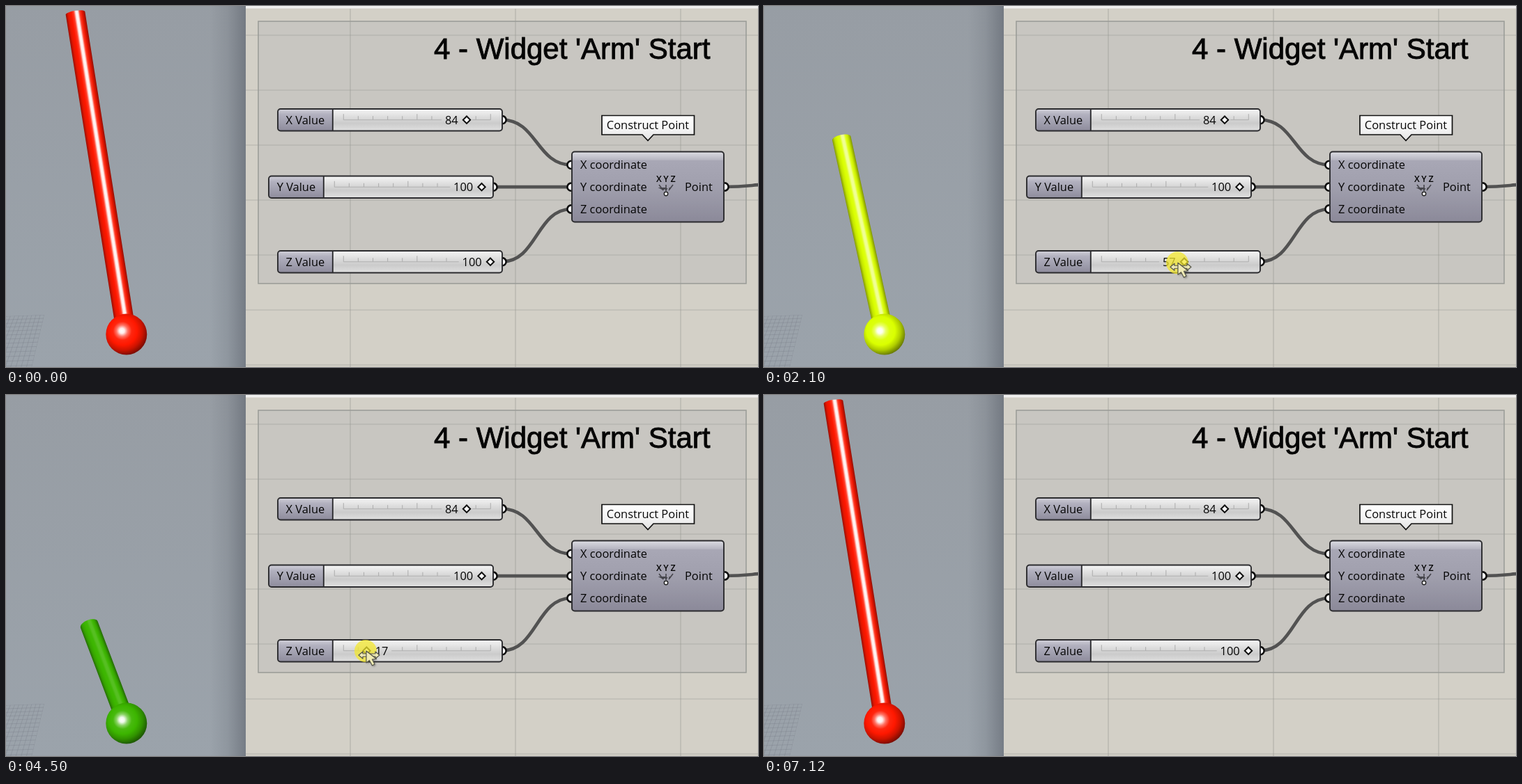
Animation of 1079x519 px, one loop 7650 ms. Source, as an HTML page with a canvas:

```html
<!DOCTYPE html>
<html lang="en">
<head>
<meta charset="utf-8">
<title>Widget arm</title>
<style>
  html, body { margin: 0; width: 100%; height: 100%; overflow: hidden; background: #d3d0c6; }
  canvas { display: block; }
</style>
</head>
<body>
<canvas id="stage" width="1079" height="519"></canvas>
<script>
const W = 1079, H = 519, LOOP = 7650;
const ctx = document.getElementById('stage').getContext('2d');
const LABEL = '16.4px "Open Sans", "Noto Sans", sans-serif';
const BALL = { x: 172.8, y: 472, r: 29.5 };

// the drag: time, unclamped slider value, pointer height
const DRAG = [
  [1230, 112, 365], [3080, -4, 374], [3960, -4, 374], [4500, 17, 368],
  [5340, 55, 347], [6200, 94, 352], [6440, 103, 350]
];

const clamp = (v, lo, hi) => Math.min(hi, Math.max(lo, v));
const mix = (a, b, k) => a + (b - a) * k;
const progress = (t, from, to) => clamp((t - from) / (to - from), 0, 1);
const knobAt = value => 481 + 2.14 * value;

function dragAt(t) {
  const i = DRAG.findIndex(key => t < key[0]);
  if (i === 0) return DRAG[0].slice(1);
  if (i < 0) return DRAG[DRAG.length - 1].slice(1);
  const a = DRAG[i - 1], b = DRAG[i], k = progress(t, a[0], b[0]);
  return [mix(a[1], b[1], k), mix(a[2], b[2], k)];
}

// k below zero darkens, above zero lightens
function shade(rgb, k) {
  return `rgb(${rgb.map(v => Math.round(k < 0 ? v * (1 + k) : mix(v, 255, k)))})`;
}

function ramp(g, stops) {
  stops.forEach(([at, color]) => g.addColorStop(at, color));
  return g;
}
const across = (x0, x1, stops) => ramp(ctx.createLinearGradient(x0, 0, x1, 0), stops);
const down = (y0, y1, stops) => ramp(ctx.createLinearGradient(0, y0, 0, y1), stops);

function path(points, close) {
  ctx.beginPath();
  points.forEach(([x, y]) => ctx.lineTo(x, y));
  if (close) ctx.closePath();
}

function line(x0, y0, x1, y1) {
  path([[x0, y0], [x1, y1]]);
  ctx.stroke();
}

function disc(x, y, r, fill) {
  ctx.beginPath();
  ctx.arc(x, y, r, 0, Math.PI * 2);
  ctx.fillStyle = fill;
  ctx.fill();
}

function pen(color, width) {
  ctx.strokeStyle = color;
  ctx.lineWidth = width;
}

function text(str, x, y, align = 'left', font = LABEL) {
  ctx.font = font;
  ctx.textAlign = align;
  ctx.fillStyle = '#050505';
  ctx.fillText(str, x, y);
}

function drawViewport() {
  ctx.fillStyle = down(0, H, [[0, '#979da4'], [1, '#9ba3ab']]);
  ctx.fillRect(0, 0, 344, H);
  ctx.save();
  path([[0, 446], [55, 444], [37, H], [0, H]], true);
  ctx.clip();
  pen('rgba(105,112,122,.32)', .8);
  for (let i = 0; i < 14; i++) {
    const y = 444 + i * 5 + i * i * .08;
    line(0, y + 2, 55, y);
    line(55 - i * 6, 444, 37 - i * 7.6, H);
  }
  ctx.restore();
}

// green through yellow to red
function armColor(v) {
  return [
    clamp(3.95 * v - 7, 40, 255),
    Math.min(255, 150 + 1.84 * v, 24 + 11.4 * (100 - v)),
    0
  ];
}

function drawArm(v) {
  const x = 122 - .14 * v - .00085 * v * v;
  const y = 371 - v * (1.957 + .0275 * v - .00011 * v * v);
  const dx = BALL.x - x, dy = BALL.y - y, length = Math.hypot(dx, dy);
  const half = 13 + v / 100, cap = 7.8 - .043 * v;
  const rgb = armColor(v), gloss = clamp((v - 5) / 85, .1, 1);

  ctx.save();
  ctx.translate(x, y);
  ctx.rotate(Math.atan2(dy, dx) - Math.PI / 2);
  ctx.beginPath();
  ctx.ellipse(0, 0, half, cap, 0, Math.PI, Math.PI * 2);
  ctx.lineTo(half, length);
  ctx.lineTo(-half, length);
  ctx.closePath();
  ctx.fillStyle = across(-half, half, [
    [0, shade(rgb, -.4)], [.14, shade(rgb, -.1)], [.3, shade(rgb, 0)],
    [.42, shade(rgb, gloss * .15)], [.53, shade(rgb, gloss * .95)],
    [.63, shade(rgb, gloss * .95)], [.73, shade(rgb, gloss * .15)],
    [.84, shade(rgb, -.08)], [1, shade(rgb, -.42)]
  ]);
  ctx.fill();
  ctx.restore();

  disc(BALL.x, BALL.y, BALL.r, ramp(ctx.createRadialGradient(166, 467, 0, 169, 467, 37), [
    [0, '#fff'], [.1, shade(rgb, .92)], [.22, shade(rgb, .4)], [.36, shade(rgb, .06)],
    [.55, shade(rgb, 0)], [.75, shade(rgb, -.2)], [1, shade(rgb, -.6)]
  ]));
}

function drawBoard() {
  const shadow = a => `rgba(80,86,96,${a})`;
  ctx.fillStyle = across(292, 344, [[0, shadow(0)], [.5, shadow(.16)], [1, shadow(.5)]]);
  ctx.fillRect(292, 0, 52, H);
  ctx.fillStyle = '#d3d0c7';
  ctx.fillRect(344, 0, W - 344, H);
  ctx.fillStyle = 'rgba(190,190,188,.5)';
  ctx.fillRect(362, 22, 700, 377);

  pen('rgba(150,150,145,.5)', 1.2);
  for (let y = 42; y < H; y += 79) line(344, y, W, y);
  for (let x = 494; x < W; x += 237) line(x, 4, x, H);
  pen('#999a96', 1.5);
  ctx.strokeRect(362, 22, 700, 377);

  ctx.fillStyle = '#f0f0ef';
  ctx.fillRect(344, 0, W - 344, 3.5);
  const title = "4 - Widget 'Arm' Start";
  text(title, 614, 76, 'left', '42px "Liberation Sans", Arial, sans-serif');
  pen('#050505', .9);
  ctx.strokeText(title, 614, 76);
}

function wire(x0, y0, x1, y1) {
  const mid = (x0 + x1) / 2;
  pen('#525252', 4.7);
  ctx.beginPath();
  ctx.moveTo(x0, y0);
  ctx.bezierCurveTo(mid, y0, mid, y1, x1, y1);
  ctx.stroke();
}

function grip(x, y, side) {
  ctx.beginPath();
  ctx.arc(x, y, 5.6, -Math.PI / 2, Math.PI / 2, side < 0);
  ctx.fillStyle = '#fff';
  ctx.fill();
  pen('#0c0c0c', 2.6);
  ctx.stroke();
}

function box(x, y, w, h) {
  ctx.beginPath();
  ctx.roundRect(x, y, w, h, 4);
}

function drawSlider(name, x, y, value, knob) {
  const w = 322, h = 31.5, mid = y + 15.7, split = x + 78.8;
  grip(x + w, mid, 1);
  ctx.save();
  box(x, y, w, h);
  ctx.clip();
  ctx.fillStyle = down(y, y + h, [[0, '#f6f6f6'], [.35, '#dedede'], [.65, '#cbcbcb'], [1, '#e0e0e0']]);
  ctx.fillRect(x, y, w, h);
  ctx.fillStyle = down(y, y + h, [[0, '#d2d1da'], [.25, '#b2b1bf'], [1, '#8e8c9c']]);
  ctx.fillRect(x, y, split - x, h);
  ctx.restore();

  // the scale leaves room for the knob and its number
  const side = value < 50 ? 1 : -1;
  const room = side * (17 + 9.4 * String(value).length);
  const left = knob + Math.min(-8, room), right = knob + Math.max(8, room);
  const start = split + 15.5, gap = 21.1, end = start + gap * 10;
  pen('#b0b0b0', 1.1);
  if (left > start) line(start, mid, Math.min(left, end), mid);
  if (right < end) line(Math.max(right, start), mid, end, mid);
  for (let i = 0; i <= 10; i++) {
    const px = start + i * gap;
    if (px < left || px > right) line(px, mid - (i % 5 ? 5.5 : 8.5), px, mid);
  }

  pen('#2b2b2e', 1.9);
  box(x, y, w, h);
  ctx.stroke();
  line(split, y, split, y + h);
  text(name, (x + split) / 2, mid + 6, 'center');
  text(value, knob + side * 12.3, mid + 6, side > 0 ? 'left' : 'right');

  path([[knob, mid - 5.2], [knob + 5.2, mid], [knob, mid + 5.2], [knob - 5.2, mid]], true);
  ctx.fillStyle = '#fff';
  ctx.fill();
  pen('#0c0c0c', 2);
  ctx.stroke();
}

function drawIcon() {
  const font = '600 12.5px "Open Sans", "Noto Sans", sans-serif';
  pen('#45454b', 1.6);
  for (let i = -1; i <= 1; i++) {
    text('XYZ'[i + 1], 947 + i * 10, 253, 'center', font);
    const tipX = 947 + i * 4, tipY = 266 - Math.abs(i);
    line(947 + i * 10, 257, tipX, tipY);
    path([[tipX + i * 5 - 2.5, tipY - 4], [tipX + i - i * 3 + 2.5, tipY - 4], [tipX, tipY]], true);
    ctx.fillStyle = '#45454b';
    ctx.fill();
  }
  disc(947, 270, 2.7, '#fff');
  pen('#222', 1.4);
  ctx.stroke();
}

function drawComponent() {
  for (let i = 0; i < 3; i++) grip(811, 228.4 + i * 31.8, -1);
  grip(1031, 260, 1);
  box(812, 209.5, 218, 101);
  ctx.fillStyle = down(209, 311, [
    [0, '#e4e4e9'], [.04, '#d0d0d8'], [.12, '#b6b5c1'], [.13, '#a8a7b5'], [.5, '#a09fad'], [1, '#8b8999']
  ]);
  ctx.fill();
  pen('#2b2b2e', 1.9);
  ctx.stroke();
  for (let i = 0; i < 3; i++) text('XYZ'[i] + ' coordinate', 824, 234.2 + i * 31.8);
  text('Point', 974, 265.8);
  drawIcon();

  path([[855, 157.5], [987.5, 157.5], [987.5, 185], [929, 185], [921, 193.5], [913, 185], [855, 185]], true);
  ctx.fillStyle = down(157, 193, [[0, '#fff'], [.5, '#f6f6f6'], [1, '#e2e2e2']]);
  ctx.fill();
  pen('#111', 1.7);
  ctx.stroke();
  text('Construct Point', 921, 176.5, 'center');
}

// glides in, follows the knob with a slow drift, then leaves
function pointerAt(t) {
  if (t < 1230) {
    const k = 1 - (1 - progress(t, 150, 900)) ** 2;
    return [mix(868, 693, k), mix(472, 365, k)];
  }
  const [raw, y] = dragAt(t);
  const x = Math.min(knobAt(raw) - 13 + (Math.min(t, 6440) - 1560) * .0039, t < 3000 ? 693 : W);
  const k = progress(t, 6440, 7100);
  return [mix(x, 942, k), mix(y, 524, k)];
}

function drawPointer(t) {
  if (t < 185 || t > 7100) return;
  const [x, y] = pointerAt(t);
  if (t >= 1200 && t < 6450) disc(x, y, 16, 'rgba(244,233,45,.74)');
  ctx.save();
  ctx.translate(x, y);
  ctx.lineJoin = 'round';
  ctx.fillStyle = '#efeab4';
  pen('#55554a', 1.2);
  if (t >= 1000 && t < 6500) {
    path([[-10, 6], [-4, 1], [-4, 4], [14, 4], [14, 1], [20, 6], [14, 11], [14, 8], [-4, 8], [-4, 11]], true);
    ctx.fill();
    ctx.stroke();
  }
  path([[1, 0], [1, 17], [5.5, 13.5], [9.5, 21], [13, 19], [9.5, 12], [15.5, 11.5]], true);
  ctx.shadowColor = 'rgba(0,0,0,.4)';
  ctx.shadowBlur = 3;
  ctx.shadowOffsetX = ctx.shadowOffsetY = 1.5;
  ctx.fill();
  ctx.shadowColor = 'transparent';
  ctx.stroke();
  ctx.restore();
}

function draw(t) {
  const value = Math.round(clamp(dragAt(t)[0], 0, 100));
  drawViewport();
  drawArm(value);
  drawBoard();
  wire(712, 163.6, 811, 228.4);
  wire(699, 260.2, 811, 260.2);
  wire(712, 367.6, 811, 292);
  wire(1031, 260, 1110, 256);
  drawSlider('X Value', 390, 148, 84, 661);
  drawSlider('Y Value', 377, 244.5, 100, 682.5);
  drawSlider('Z Value', 390, 352, value, knobAt(value));
  drawComponent();
  drawPointer(t);
}

const begin = performance.now();
function tick() {
  draw((performance.now() - begin) % LOOP);
  requestAnimationFrame(tick);
}
tick();
</script>
</body>
</html>
```
